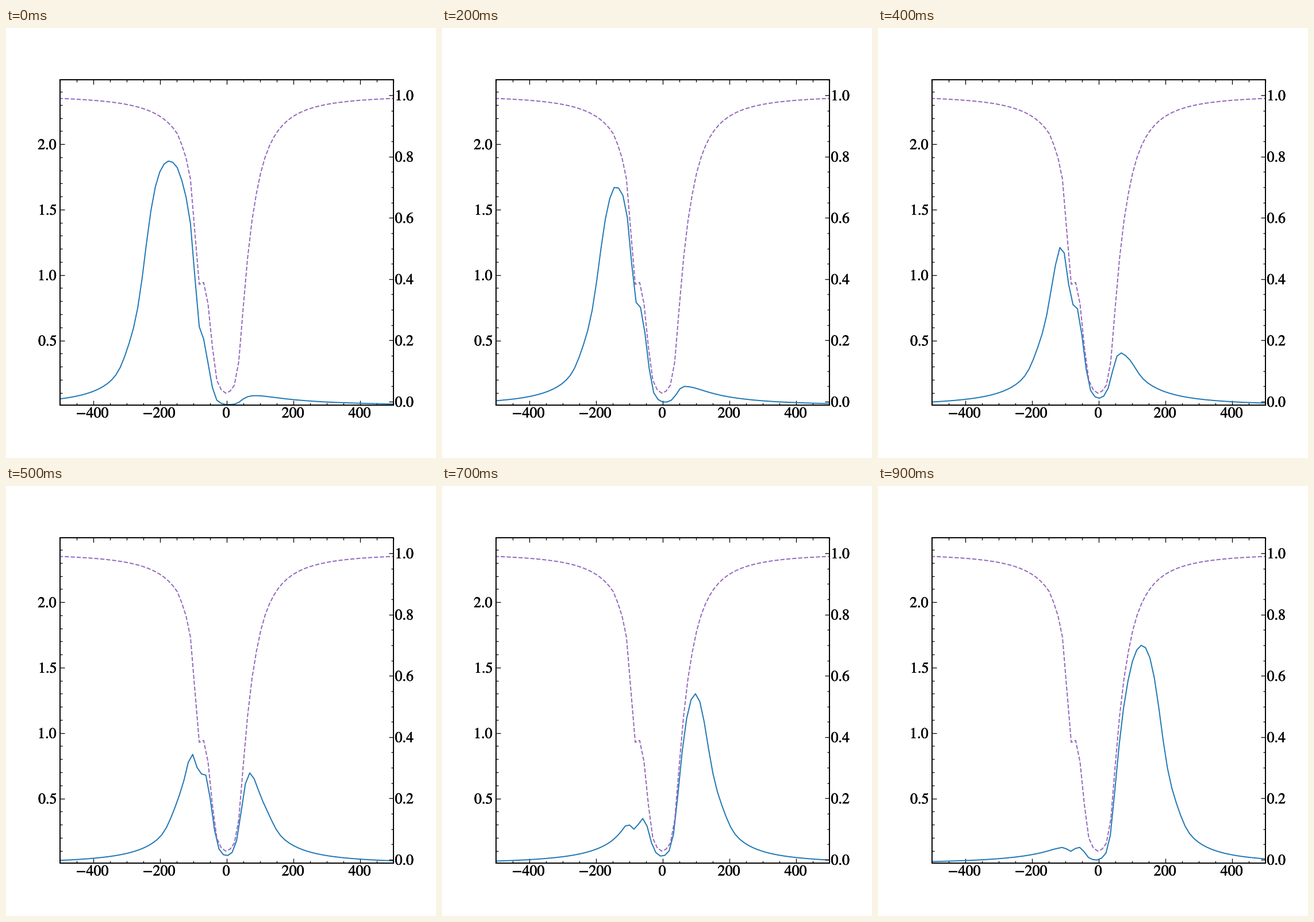
Write a matplotlib script that moves like this. It is 748 px wide and 748 px high and loops after 1 s.

```python
import numpy as np
import matplotlib.pyplot as plt
import matplotlib.patheffects as pe
from matplotlib.animation import FuncAnimation
from matplotlib.ticker import AutoMinorLocator, MultipleLocator, NullFormatter

SIZE, DPI, FRAMES = 748, 187, 10
LEFT, RIGHT, TOP, BOTTOM = 93.8, 673.8, 90.0, 655.8
X_LIM, Y_LIM, T_LIM = (-500, 500), (0.0066, 2.493), (-0.0109, 1.0507)
BLUE, PURPLE = "#1f77b4", "#9467bd"
STEP, OFFSET = 13.17, -3.1          # spacing and origin of the velocity grid
START, DRIFT = -154.5, 27.67        # emission centre and its shift per frame

plt.rcParams["mathtext.fontset"] = "stix"

grid = OFFSET + STEP * np.arange(-70, 71)
core_v = OFFSET + STEP * np.arange(-10, 7)
core_t = [0.839, 0.795, 0.726, 0.553, 0.383, 0.389, 0.319, 0.178, 0.070,
          0.039, 0.028, 0.034, 0.054, 0.131, 0.305, 0.468, 0.590]


def transmission(v):
    """Saturated line with a narrow companion on its blue side."""
    depth = (57.75 / np.maximum(np.abs(v), 1)) ** 2.104
    wings = 0.028 + 0.972 * np.exp(-depth)
    inside = (v >= core_v[0]) & (v <= core_v[-1])
    return np.where(inside, np.interp(v, core_v, core_t), wings)


def emission(d, half=90, gamma=38):
    """Box profile broadened by a Lorentzian, with slightly raised shoulders."""
    box = 0.89 * np.arctan2(2 * half * gamma, d**2 + gamma**2 - half**2)
    return box + 0.045 * np.exp(-((np.abs(d) - 138) / 25) ** 2)


def to_px(value, limits, start, end):
    return start + (value - limits[0]) / (limits[1] - limits[0]) * (end - start)


def label(x, y, text, align):
    fig.text(x / SIZE, 1 - y / SIZE, f"${text}$", size=10, ha=align, va="baseline",
             path_effects=[pe.withStroke(linewidth=0.2, foreground="black")])


def style_axis(axis, major, parts):
    axis.set_major_locator(MultipleLocator(major))
    axis.set_minor_locator(AutoMinorLocator(parts))
    axis.set_major_formatter(NullFormatter())


fig = plt.figure(figsize=(SIZE / DPI, SIZE / DPI), dpi=DPI, facecolor="white")
ax = fig.add_axes([LEFT / SIZE, 1 - BOTTOM / SIZE,
                   (RIGHT - LEFT) / SIZE, (BOTTOM - TOP) / SIZE])
twin = ax.twinx()
ax.set(xlim=X_LIM, ylim=Y_LIM)
twin.set_ylim(T_LIM)

style_axis(ax.xaxis, 200, 4)
style_axis(ax.yaxis, 0.5, 5)
style_axis(twin.yaxis, 0.2, 4)
for a in (ax, twin):
    a.tick_params(which="major", direction="in", length=3, width=0.5)
    a.tick_params(which="minor", direction="in", length=1.5, width=0.5)
    for spine in a.spines.values():
        spine.set_linewidth(0.65)
ax.tick_params(axis="x", which="both", top=True)

for v in range(-400, 401, 200):
    shift = 1 if v < 0 else 0
    label(to_px(v, X_LIM, LEFT, RIGHT) - shift, 677.5, v, "center")
for v in (0.5, 1.0, 1.5, 2.0):
    label(89, to_px(v, Y_LIM, BOTTOM, TOP) + 8.8, f"{v:.1f}", "right")
for v in np.arange(6) / 5:
    label(676.5, to_px(v, T_LIM, BOTTOM, TOP) + 8.8, f"{v:.1f}", "left")

line, = ax.plot([], [], color=BLUE, lw=0.75)
twin.plot(grid, transmission(grid), color=PURPLE, lw=0.75, ls="--")


def update(frame):
    shift = DRIFT * frame
    v = grid + shift
    line.set_data(v, emission(v - START - shift) * transmission(v))
    return line,


anim = FuncAnimation(fig, update, frames=FRAMES, interval=100, repeat=True,
                     repeat_delay=0, blit=False)
plt.show()
```
